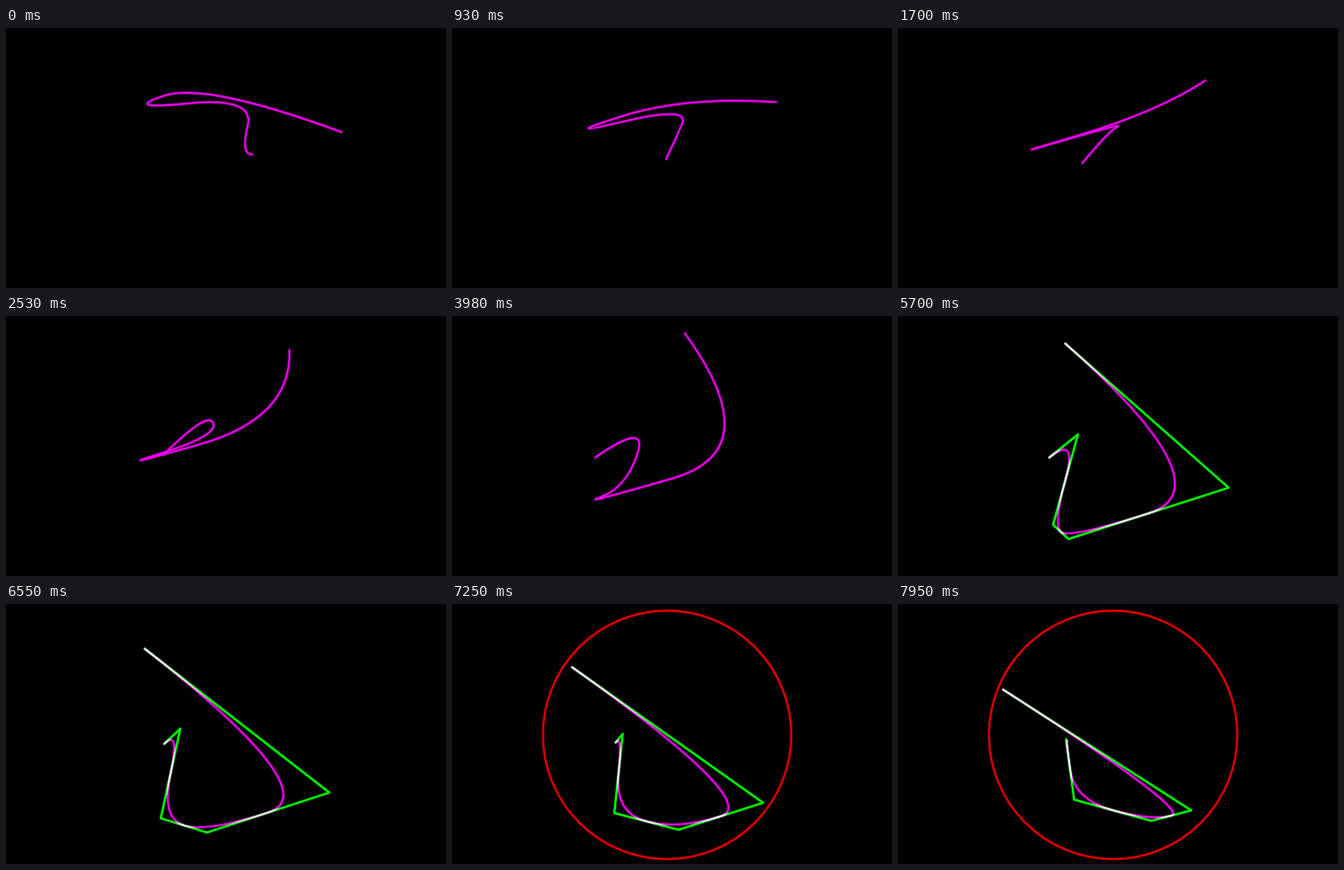
Write an HTML page with a canvas that moves like this. It is 496 by 293 pixels and loops after 8 s.

```html
<!DOCTYPE html>
<html lang="en">
<head>
<meta charset="utf-8">
<title>Spline in a sphere</title>
<style>
  html, body { margin: 0; width: 100%; height: 100%; overflow: hidden; background: #000; }
  canvas { display: block; }
</style>
</head>
<body>
<canvas id="stage" width="496" height="293"></canvas>
<script>
const ctx = document.getElementById('stage').getContext('2d');
const LOOP = 8000, POLYGON_FROM = 4170, CIRCLE_FROM = 7000;

// Time in ms, then x, y of the six control points.
const POSES = [
  [0,    378, 117, 224,  60, 130,  92, 280,  77, 264, 142, 277, 142],
  [930,  365,  83, 262,  76, 116, 123, 268,  87, 250, 128, 241, 147],
  [2530, 319,  38, 322, 115, 111, 174, 239, 134, 227, 106, 177, 156],
  [3980, 262,  19, 358, 151, 138, 214, 196, 193, 221, 117, 161, 159],
  [4900, 222,  20, 371, 173, 163, 237, 182, 219, 210, 126, 164, 160],
  [6550, 156,  50, 364, 212, 226, 257, 174, 241, 196, 140, 178, 157],
  [7950, 118,  96, 330, 232, 285, 244, 198, 220, 189, 152, 190, 154]
];
const LAST = POSES.length - 1;

const slope = (i, c) => (POSES[i + 1][c] - POSES[i][c]) / (POSES[i + 1][0] - POSES[i][0]);

// Velocity of coordinate c at pose i, from the parabola through its neighbours.
function velocity(i, c) {
  const mid = Math.min(Math.max(i, 1), LAST - 1);
  const before = POSES[mid][0] - POSES[mid - 1][0];
  const after = POSES[mid + 1][0] - POSES[mid][0];
  const a = slope(mid - 1, c), b = slope(mid, c);
  const centre = (a * after + b * before) / (before + after);
  if (i < mid) return 2 * a - centre;
  if (i > mid) return 2 * b - centre;
  return centre;
}

function coordinate(time, c) {
  let i = 0;
  while (i < LAST - 1 && time >= POSES[i + 1][0]) i++;
  const span = POSES[i + 1][0] - POSES[i][0];
  const u = (time - POSES[i][0]) / span, v = 1 - u;
  return v * v * (1 + 2 * u) * POSES[i][c] + u * u * (1 + 2 * v) * POSES[i + 1][c]
    + u * v * span * (v * velocity(i, c) - u * velocity(i + 1, c));
}

const controlPoints = time =>
  Array.from({ length: 6 }, (_, k) => [coordinate(time, 1 + 2 * k), coordinate(time, 2 + 2 * k)]);

function glowStroke(path, rgb) {
  for (const [width, alpha] of [[3.6, 0.35], [1.8, 0.95]]) {
    ctx.lineWidth = width;
    ctx.strokeStyle = `rgba(${rgb}, ${alpha})`;
    ctx.stroke(path);
  }
}

// Clamped quadratic B-spline: it touches the middle of every inner edge.
function splinePath(points) {
  const path = new Path2D();
  path.moveTo(...points[0]);
  for (let k = 1; k < 5; k++) {
    const [x, y] = points[k], [nx, ny] = points[k + 1];
    const end = k === 4 ? [nx, ny] : [(x + nx) / 2, (y + ny) / 2];
    path.quadraticCurveTo(x, y, ...end);
  }
  return path;
}

function polygonPath(points) {
  const path = new Path2D();
  points.forEach(p => path.lineTo(...p));
  return path;
}

const circle = new Path2D();
circle.arc(242, 147, 140, 0, 2 * Math.PI);

function draw(time) {
  const points = controlPoints(time);
  ctx.setTransform(1, 0, 0, 1, 0, 0);
  ctx.globalCompositeOperation = 'source-over';
  ctx.fillStyle = '#000';
  ctx.fillRect(0, 0, 496, 293);
  ctx.translate(0.5, 0.5);
  ctx.lineCap = ctx.lineJoin = 'round';
  ctx.globalCompositeOperation = 'lighten';
  if (time >= CIRCLE_FROM) glowStroke(circle, '240, 0, 0');
  glowStroke(splinePath(points), '255, 0, 255');
  // Adding green to magenta turns shared stretches white.
  ctx.globalCompositeOperation = 'lighter';
  if (time >= POLYGON_FROM) glowStroke(polygonPath(points), '0, 255, 0');
}

const start = performance.now();
function tick() {
  draw((performance.now() - start) % LOOP);
  requestAnimationFrame(tick);
}
tick();
</script>
</body>
</html>
```
